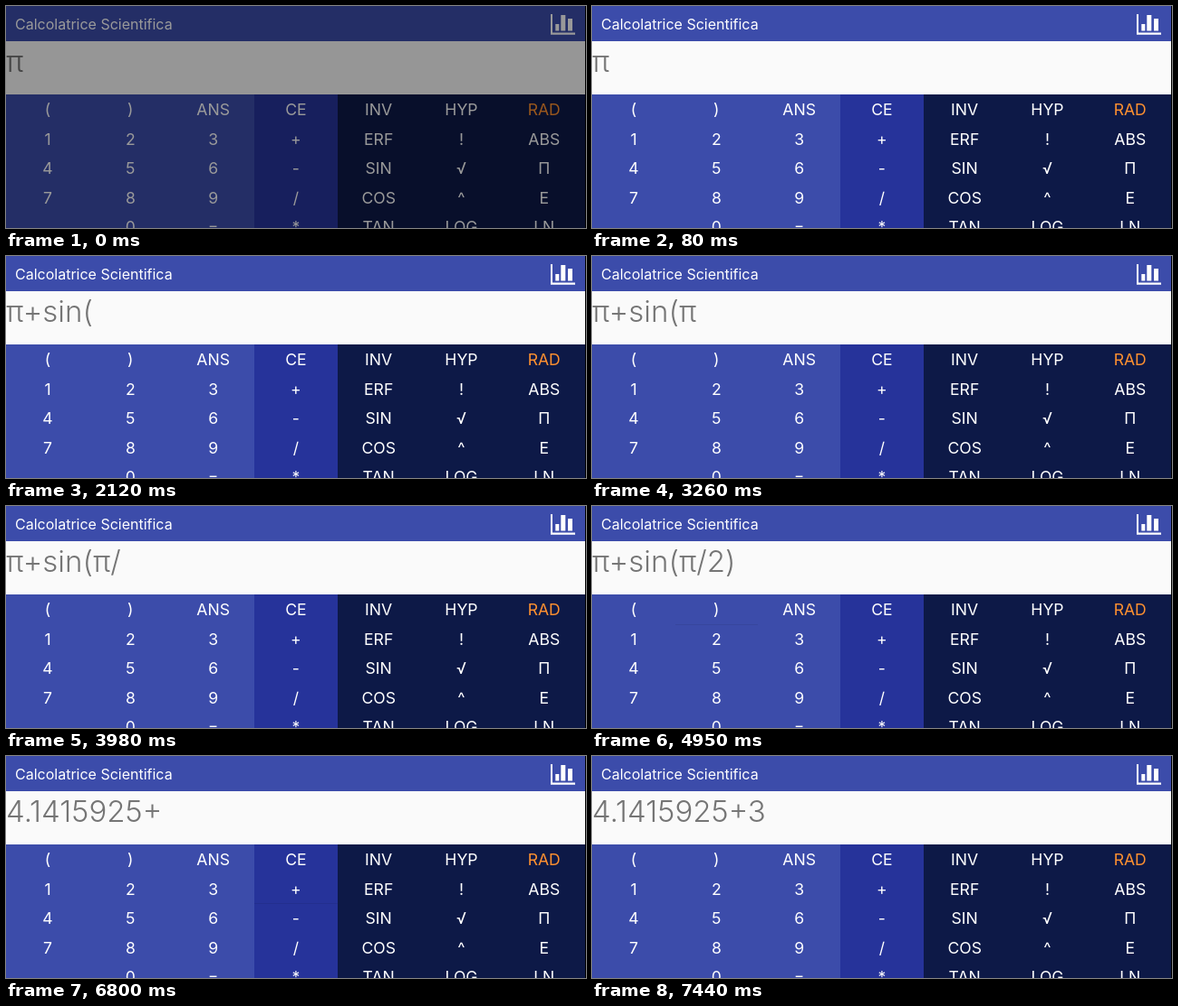
Animation, 640 px wide and 246 px high, one loop 8000 ms. Source, as an HTML page:

```html
<!DOCTYPE html>
<html lang="it">
<head>
<meta charset="utf-8">
<title>Calcolatrice Scientifica</title>
<style>
  html, body { margin: 0; width: 100%; height: 100%; overflow: hidden; background: #000; }
  svg { display: block; width: 100%; height: 100%; font-family: Inter, "Noto Sans", sans-serif; }
  .title { font-size: 16px; fill: #fff; }
  .display { font-size: 33px; font-weight: 300; fill: #757575; }
  .key { font-size: 17.6px; fill: #fff; text-anchor: middle; }
  .mode { fill: #ff9130; }
</style>
</head>
<body>
<svg id="stage" viewBox="0 0 640 246" preserveAspectRatio="none">
  <rect width="639" height="246" fill="#3c4caa"/>
  <text class="title" x="10" y="25.5">Calcolatrice Scientifica</text>
  <path fill="#fff" d="M601 9h2v20.5h25v2.3h-27zM606.3 20h4v7.5h-4zM612.3 10h5v17.5h-5zM620 14h5v13.5h-5z"/>
  <rect y="39" width="639" height="59" fill="#fafafa"/>
  <text class="display" id="display" x="0" y="73"></text>
  <rect x="274" y="98" width="92" height="148" fill="#26339a"/>
  <rect x="366" y="98" width="273" height="148" fill="#0d1947"/>
  <g id="keys"></g>
  <rect id="press" height="1" fill="#000" fill-opacity=".08"/>
  <rect id="shade" width="639" height="246" fill="#000" fill-opacity=".4"/>
</svg>
<script>
const LOOP = 8000, COLUMN = 639 / 7, ROW = 32.5, TOP = 98;
const ROWS = [
  ["(", ")", "ANS", "CE", "INV", "HYP", "RAD"],
  ["1", "2", "3", "+", "ERF", "!", "ABS"],
  ["4", "5", "6", "-", "SIN", "√", "Π"],
  ["7", "8", "9", "/", "COS", "^", "E"],
  ["", "0", "=", "*", "TAN", "LOG", "LN"]
];

// [start in ms, shown expression]
const ENTRIES = [
  [0, "π"], [1230, "π+"], [2120, "π+sin("], [3260, "π+sin(π"],
  [3980, "π+sin(π/"], [4390, "π+sin(π/2"], [4950, "π+sin(π/2)"],
  [5670, "4.1415925"], [6800, "4.1415925+"], [7360, "4.1415925+3"]
];

// [start, end, column, row] of each pressed key
const PRESSES = [
  [1070, 1310, 3, 1], [3580, 3980, 3, 3], [4310, 4470, 1, 1],
  [4870, 5670, 1, 0], [6240, 6960, 3, 1], [7120, 7440, 2, 1]
];

const byId = id => document.getElementById(id);
const display = byId("display"), press = byId("press"), shade = byId("shade");

ROWS.forEach((labels, row) => labels.forEach((label, column) => {
  const key = document.createElementNS("http://www.w3.org/2000/svg", "text");
  key.setAttribute("class", label === "RAD" ? "key mode" : "key");
  key.setAttribute("x", (column + 0.5) * COLUMN + 0.4);
  key.setAttribute("y", TOP + 23.2 + row * ROW);
  key.textContent = label;
  byId("keys").append(key);
}));

function show(element, visible) {
  element.setAttribute("visibility", visible ? "visible" : "hidden");
}

function render(time) {
  const text = ENTRIES.findLast(([start]) => time >= start)[1];
  if (display.textContent !== text) display.textContent = text;

  const active = PRESSES.find(([start, end]) => time >= start && time < end);
  show(press, active);
  if (active) {
    const [, , column, row] = active;
    const left = Math.ceil(column * COLUMN);
    press.setAttribute("x", left);
    press.setAttribute("width", Math.ceil((column + 1) * COLUMN) - left);
    press.setAttribute("y", Math.round(TOP + (row + 1) * ROW));
  }
  show(shade, time < 80);
}

const origin = performance.now();
function tick() {
  render((performance.now() - origin) % LOOP);
  requestAnimationFrame(tick);
}
tick();
</script>
</body>
</html>
```
